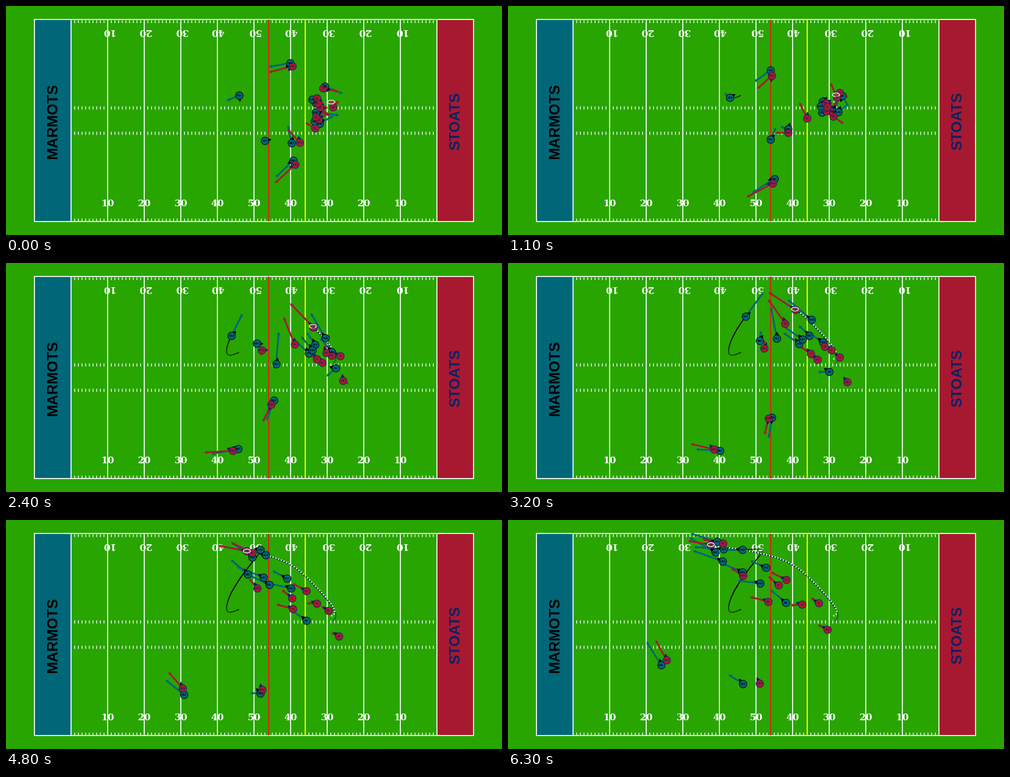
Animation, 1098 px wide and 510 px high, one loop 6.4 s. Source, as a matplotlib script:

```python
import numpy as np
import matplotlib.pyplot as plt
from matplotlib.animation import FuncAnimation
from matplotlib.collections import LineCollection, PolyCollection
from matplotlib.colors import to_rgb
from matplotlib.patches import Ellipse, Rectangle

W, H, DPI = 1098, 510, 72          # at 72 dpi one point is one pixel
FRAMES, STEP = 64, 100
GRASS, TEAL, CRIMSON, NAVY = "#28a500", "#006778", "#a71930", "#0b2265"
LEFT, RIGHT, TOP, BOTTOM, YARD = 63, 1035, 30, 480, 8.1
TIMES = np.arange(FRAMES) * STEP / 1000
KEY_TIMES = {4: (0, 1.1, 2.4, 6.3),
             5: (0, 1.1, 2.4, 4.1, 6.3),
             7: (0, 1.1, 2.4, 3.2, 4.1, 5.5, 6.3)}
HOME, AWAY = 0, 1
TEAM_FILL, TEAM_INK = (TEAL, CRIMSON), ("black", NAVY)


def spline(*points):
    """Natural cubic spline through the waypoints, sampled at every frame."""
    p = np.array(points, float)
    n = len(p)
    t = np.array(KEY_TIMES[n])
    h = np.diff(t)
    chord = np.diff(p, axis=0) / h[:, None]
    system, rhs = np.zeros((n, n)), np.zeros((n, 2))
    for i in range(n - 1):
        system[i:i + 2, i:i + 2] += np.array([[2, 1], [1, 2]]) / h[i]
        rhs[i:i + 2] += 3 * chord[i] / h[i]
    m = np.linalg.solve(system, rhs)
    i = np.clip(np.searchsorted(t, TIMES, "right") - 1, 0, n - 2)
    span = h[i][:, None]
    u = (TIMES - t[i])[:, None] / span
    return (p[i] + (p[i + 1] - p[i]) * (3*u**2 - 2*u**3)
            + span * u * (1 - u) * (m[i] * (1 - u) - m[i + 1] * u))


def circling(path, radius, degrees):
    """A defender who slides around the man he covers."""
    a = np.radians(degrees)
    return path + np.column_stack([radius * np.cos(a), radius * np.sin(a)])


qb = spline((724, 225), (728, 203), (680, 143), (636, 104), (579, 80), (491, 62),
            (449, 55))
ball_path = qb + np.exp(-TIMES / 1.5)[:, None] * (-4, -11)
receiver = spline((640, 353), (586, 395), (502, 418), (415, 397), (351, 312))

paths = {
    HOME: {
        "SS2": spline((516, 199), (491, 204), (499, 162), (526, 119), (558, 78),
                      (550, 65), (519, 66)),
        "SS1": spline((573, 300), (581, 297), (598, 225), (574, 112), (463, 48)),
        "CB1": circling(receiver, 10 + TIMES, 40 * TIMES - 115),
        "CB2": spline((629, 127), (581, 143), (555, 179), (554, 145), (459, 72)),
        "CB3": spline((632, 305), (620, 274), (593, 306), (576, 378), (520, 365)),
        "OLB": spline((694, 262), (721, 235), (707, 167), (619, 93), (477, 65)),
        "DE": spline((706, 179), (740, 200), (730, 234), (615, 184)),
        "DT1": spline((683, 257), (695, 237), (670, 201), (519, 116)),
        "DT2": spline((685, 215), (696, 213), (684, 182), (571, 106)),
        "ILB1": spline((678, 208), (692, 223), (678, 194), (475, 92)),
        "ILB2": spline((686, 237), (731, 236), (721, 198), (558, 141)),
    },
    AWAY: {
        "QB": qb,
        "WR3": receiver,
        "WR1": spline((634, 134), (584, 155), (566, 194), (565, 168), (520, 124)),
        "WR2": spline((650, 304), (620, 282), (587, 315), (571, 372), (557, 364)),
        "TE": spline((684, 272), (662, 250), (639, 181), (576, 93), (476, 52)),
        "RB": spline((695, 226), (720, 246), (746, 262), (707, 244)),
        "T1": spline((692, 254), (713, 234), (721, 206), (651, 188)),
        "T2": spline((702, 183), (734, 193), (740, 207), (688, 185)),
        "G1": spline((688, 205), (703, 216), (709, 200), (616, 133)),
        "G2": spline((686, 248), (704, 234), (700, 222), (576, 182)),
        "C": spline((690, 217), (707, 225), (688, 214), (599, 145)),
    },
}


def velocity(path):
    return np.gradient(path, STEP / 1000, axis=0, edge_order=2)


def facing(path):
    """Players look where they run, and towards the ball when slow."""
    to_ball = ball_path - path
    to_ball /= np.hypot(*to_ball.T)[:, None] + 8
    look = velocity(path) / 35 + 0.9 * to_ball
    return look / (np.hypot(*look.T)[:, None] + 1e-6)


def arrow(pos, vel):
    length = max(np.hypot(*vel), 0.1)
    u = vel / length
    n = np.array([-u[1], u[0]])
    neck, tip = pos + u * max(length - 6.5, 0), pos + u * max(length, 6.5)
    return [pos + 1.9*n, neck + 1.9*n, neck + 3.8*n, tip,
            neck - 3.8*n, neck - 1.9*n, pos - 1.9*n]


def pointer(pos, look):
    n = np.array([-look[1], look[0]])
    return [pos + 7*look + 4.5*n, pos + 15*look, pos + 7*look - 4.5*n]


fig = plt.figure(figsize=(W / DPI, H / DPI), dpi=DPI, facecolor=GRASS)
ax = fig.add_axes([0, 0, 1, 1])
ax.set(xlim=(0, W), ylim=(H, 0))
ax.axis("off")


def stripe(x, top, bottom, color="white", lw=2.2, zorder=2):
    ax.vlines(x, top, bottom, color=color, lw=lw, zorder=zorder, snap=False)


def lettering(x, y, text, color, size, family, turn):
    ax.text(x, y, text, color=color, size=size, family=family, weight="bold", zorder=3,
            rotation=turn, rotation_mode="anchor", ha="center", va="baseline")


def draw_field():
    for x, color, ink, team in ((LEFT, TEAL, "black", "MARMOTS"),
                                (RIGHT - 10*YARD, CRIMSON, NAVY, "STOATS")):
        ax.add_patch(Rectangle((x, TOP), 10*YARD, BOTTOM - TOP, fc=color, ec="none"))
        lettering(x + 50, 256.5, team, ink, 32.5, "Liberation Sans", 90)
    ax.add_patch(Rectangle((LEFT, TOP), RIGHT - LEFT, BOTTOM - TOP, fc="none",
                           ec="white", lw=2.2, zorder=2))
    stripe(LEFT + YARD * np.arange(10, 111, 10), TOP, BOTTOM)
    for top, bottom in ((32, 38), (223.5, 230.5), (280, 287), (473.5, 479)):
        stripe(LEFT + YARD * np.arange(11, 110), top, bottom, lw=1.7)
    for i in range(1, 10):
        x, label = LEFT + YARD * (10 + 10*i), str(50 - 10 * abs(5 - i))
        lettering(x, 446.5, label, "white", 21, "DejaVu Serif", 0)
        lettering(x + 1, 52.5, label, "white", 21, "DejaVu Serif", 180)
    stripe(LEFT + 64*YARD, TOP, BOTTOM, "#e01e14", 2.5, 2.5)
    stripe(LEFT + 74*YARD, TOP, BOTTOM, "#ffff00", 2.5, 2.5)


def make_trail(path, color):
    # Slower stretches of the run are fainter.
    speed = np.hypot(*velocity(path).T)[1:]
    rgba = np.tile((*to_rgb(color), 1.0), (FRAMES - 1, 1))
    rgba[:, 3] = np.clip(0.3 + speed / 80, 0, 1)
    line = ax.add_collection(LineCollection([], linewidths=2.4, zorder=4))
    return line, np.stack([path[:-1], path[1:]], axis=1), rgba


draw_field()
squads, labels = [], []
for team, squad in paths.items():
    fill, ink = TEAM_FILL[team], TEAM_INK[team]
    squads.append((
        [(path, velocity(path), facing(path)) for path in squad.values()],
        ax.add_collection(PolyCollection([], fc=fill, ec="none", zorder=5)),
        ax.add_collection(PolyCollection([], fc=ink, ec="none", zorder=6)),
        ax.scatter([], [], s=16.8**2, c=fill, edgecolors=ink, linewidths=1.2,
                   zorder=7 + team)))
    labels += [(path, ax.text(0, 0, name, color=ink, size=6, weight="bold", zorder=10,
                              family="Liberation Sans", ha="center",
                              va="center_baseline"))
               for name, path in squad.items()]

trails = [make_trail(paths[HOME]["SS2"], "black"), make_trail(qb, NAVY)]
ball_trail, = ax.plot([], [], color="white", lw=2.8, ls=(0, (1, 1.3)), zorder=4.5)
ball = ax.add_patch(Ellipse((0, 0), 16, 8.5, fc="#82502f", ec="white", lw=1.5, zorder=9))


def update(f):
    for squad, arrows, pointers, dots in squads:
        arrows.set_verts([arrow(path[f], vel[f]) for path, vel, _ in squad])
        pointers.set_verts([pointer(path[f], look[f]) for path, _, look in squad])
        dots.set_offsets([path[f] for path, _, _ in squad])
    for path, text in labels:
        text.set_position(path[f])
    for line, segments, rgba in trails:
        line.set_segments(segments[:f])
        line.set_color(rgba[:f])
    ball_trail.set_data(*ball_path[:f + 1].T)
    ball.set_center(ball_path[f])


animation = FuncAnimation(fig, update, frames=FRAMES, interval=STEP,
                          init_func=lambda: update(0), repeat=True, repeat_delay=0)
plt.show()
```
